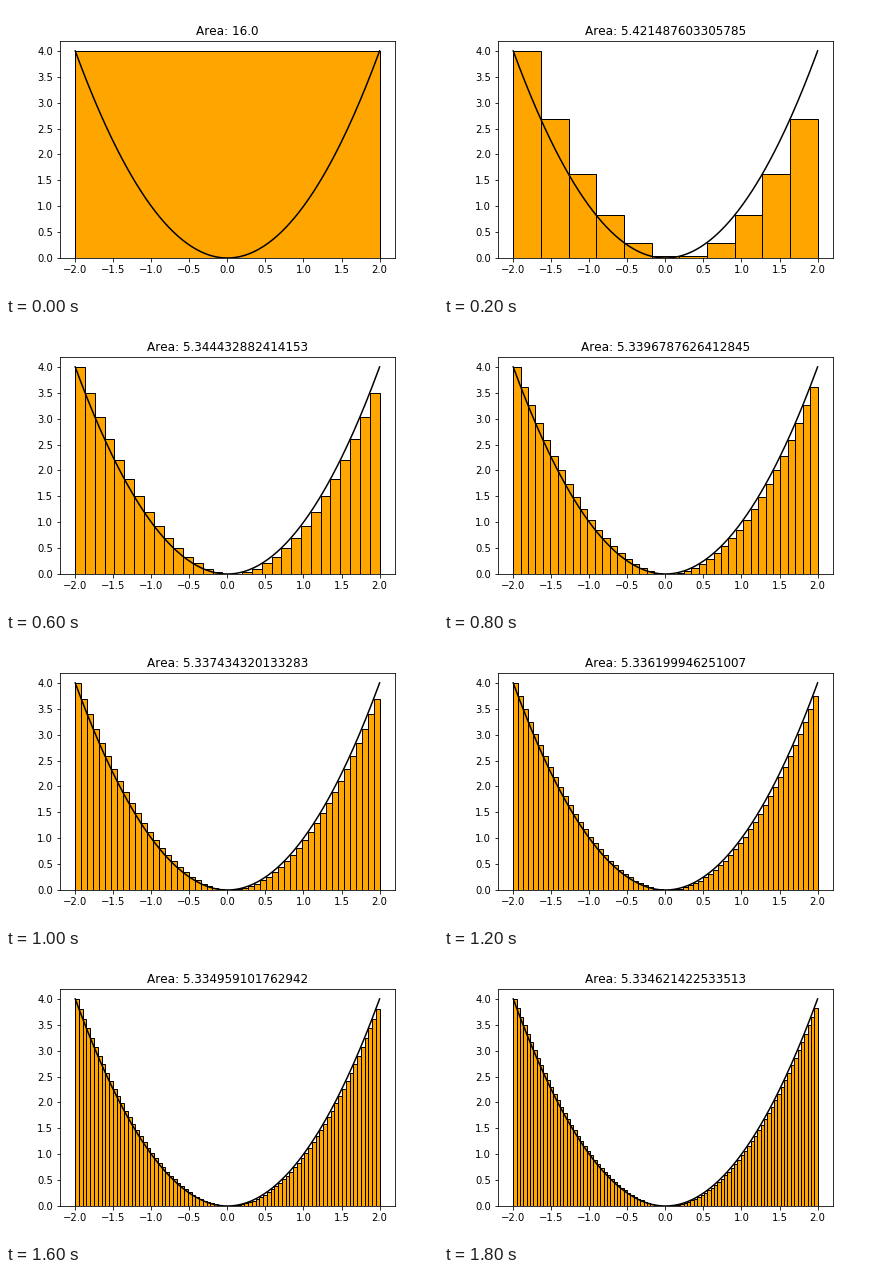
These frames come from a looping animation (432 by 288 pixels, 2 s). A matplotlib script:

```python
import matplotlib.pyplot as plt
import numpy as np
from matplotlib.animation import FuncAnimation

A, B = -2, 2
FRAMES, INTERVAL = 10, 200

# Classic text kerning
plt.rcParams["text.kerning_factor"] = 6

fig, ax = plt.subplots(figsize=(6, 4), dpi=72)
fig.subplots_adjust(left=0.125, right=0.9, bottom=0.125, top=0.88)
bars = []


def f(x):
    return x ** 2


def update(i):
    n = 10 * i + 1
    width = (B - A) / n
    x = A + width * np.arange(n)
    area = sum(f(x) * width)
    while bars:
        bars.pop().remove()
    bars.append(ax.bar(x, f(x), width, align="edge",
                       color="orange", edgecolor="black"))
    ax.set_title(f"Area: {area}")
    return []


xs = np.linspace(A, B, 200)
ax.plot(xs, f(xs), color="black")
ax.set_xlim(-2.2, 2.2)
ax.set_ylim(0, 4.2)
ax.set_xticks(np.arange(-2, 2.1, 0.5))
ax.set_yticks(np.arange(0, 4.1, 0.5))

anim = FuncAnimation(fig, update, frames=FRAMES, interval=INTERVAL,
                     init_func=lambda: [], repeat=True, repeat_delay=0)
plt.show()
```
